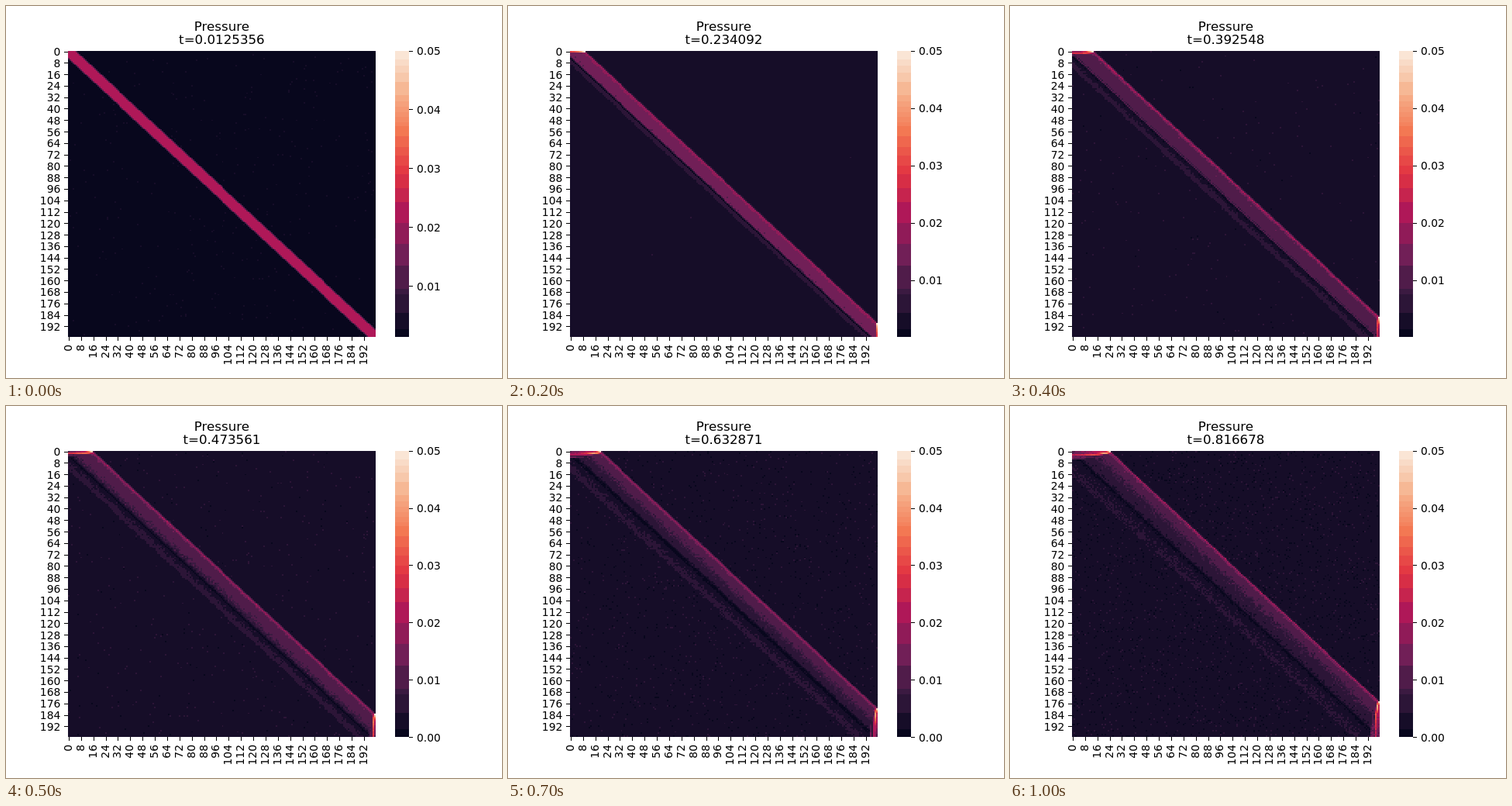
An HTML page with a canvas for the animation above (1.1 s loop, 640x480 px).

```html
<!DOCTYPE html>
<html lang="en">
<head>
<meta charset="utf-8">
<title>Pressure heatmap</title>
<style>
  html, body { margin: 0; width: 100%; height: 100%; overflow: hidden; background: #fff; }
  #stage { position: relative; width: 640px; height: 480px; overflow: hidden; }
  canvas, svg { position: absolute; left: 0; top: 0; }
  text { font: 13.89px "DejaVu Sans", sans-serif; fill: #000; }
  .title { font-size: 16.67px; text-anchor: middle; }
</style>
</head>
<body>
<div id="stage">
  <canvas id="plot" width="640" height="480"></canvas>
  <svg id="labels" width="640" height="480">
    <text class="title" x="278.4" y="32">Pressure</text>
    <text class="title" id="clock" x="278.4" y="49"></text>
    <g id="axes"></g>
    <g id="scale"></g>
  </svg>
</div>
<script>
const N = 200, STEP = 100, VMAX = 50;            // pressures are in thousandths
const BOX = { x: 80, y: 58, w: 397, h: 369 };
const BAR = { x: 502, w: 18 };
const TIMES = ['0.0125356', '0.124018', '0.234092', '0.313254', '0.392548', '0.473561',
  '0.556521', '0.632871', '0.709094', '0.762915', '0.816678'];
const VMIN = [1.3, 0.5, 0.1, 0.07, 0.04];        // zero afterwards

// Pressure across the diagonal: offsets (column - row) and values at key times.
const PROFILES = [
  { t: 0.0125, d: [6, 4, 3, 2, 0, -2, -3, -4, -6], v: [2.4, 22, 22, 22, 22, 22, 22, 22, 2.4] },
  { t: 0.234, d: [10.3, 8.8, 6.5, 3, -3.2, -5, -6, -8, -10], v: [3, 21, 15, 14, 13, 0.5, 6, 6, 3] },
  { t: 0.3925, d: [14.5, 13, 10.7, 5, -2, -3.5, -6, -10.5, -13], v: [2.9, 20, 11.5, 11, 9, 1, 3.6, 6, 2.9] },
  { t: 0.5565, d: [18.6, 17.3, 15, 9, 1, -2, -4, -12.5, -15.5], v: [2.8, 19, 11.5, 9, 5, 0.6, 2.8, 5.5, 2.8] },
  { t: 0.8167, d: [25.2, 24, 21.5, 12, 1, -1.5, -3, -15, -19], v: [2.7, 19, 11.5, 7.5, 4.4, 0.6, 2.7, 4.6, 2.7] }
];

const RAMP = ['03051a', '35193e', '701f57', 'ad1759', 'e13342', 'f37651', 'f6b48f', 'faebdd']
  .map(h => [0, 2, 4].map(i => parseInt(h.slice(i, i + 2), 16)));
// Colour steps, in pixels above the foot of the bar.
const EDGES = [0, 10, 31, 55, 62, 92, 120, 147, 174, 192, 210, 221, 234, 245, 259,
  272, 277, 284, 290, 297, 304, 312, 329, 341, 350, 358, 369];

const lerp = (a, b, k) => a + (b - a) * k;
const clamp = (x, lo, hi) => Math.min(hi, Math.max(lo, x));
const bump = x => Math.exp(-x * x);

function ramp(f) {
  const p = clamp(f, 0, 1) * 7, i = Math.min(6, Math.floor(p));
  return RAMP[i].map((c, j) => Math.round(lerp(c, RAMP[i + 1][j], p - i)));
}
const COLORS = EDGES.slice(1).map((e, i) => ramp((e + EDGES[i]) / 2 / BOX.h));
const LOOKUP = Array.from({ length: BOX.h + 1 }, (_, px) => {
  const i = EDGES.findIndex(e => e > px);
  return COLORS[i < 0 ? COLORS.length - 1 : i - 1];
});

function random(seed) {
  return () => {
    seed = (seed + 0x6d2b79f5) | 0;
    let z = Math.imul(seed ^ (seed >>> 15), 1 | seed);
    z = (z + Math.imul(z ^ (z >>> 7), 61 | z)) ^ z;
    return ((z ^ (z >>> 14)) >>> 0) / 4294967296;
  };
}

function profileAt(t) {
  let i = 0;
  while (i < PROFILES.length - 2 && t > PROFILES[i + 1].t) i++;
  const a = PROFILES[i], b = PROFILES[i + 1];
  const k = clamp((t - a.t) / (b.t - a.t), 0, 1);
  const mix = key => a[key].map((x, j) => lerp(x, b[key][j], k));
  return { d: mix('d'), v: mix('v') };
}

function across({ d, v }, x, t) {
  const last = d.length - 1;
  if (x >= d[0]) return v[0];
  if (x <= d[last]) return v[last];
  let i = 0;
  while (x < d[i + 1]) i++;
  const ripple = t > 0.3 && Math.abs(x + 2) < 3 && x & 1 ? 1.2 : 0;
  return lerp(v[i], v[i + 1], (d[i] - x) / (d[i] - d[i + 1])) - ripple;
}

// The wave piling up along a wall, curving up to its front.
function corner(depth, along, t) {
  const front = 3.4 + 25.8 * t;
  if (t < 0.1 || along > front || depth > 8) return 0;
  const s = along / front;
  const ridge = Math.max(0, 3.6 * (t - 0.2)) * (1 - s ** 3);
  const main = (24 + 23 * s * s + 8 * (1 - t)) * bump((depth - ridge) / 0.95);
  const echo = 26 * t * (1 - s) * bump((depth - ridge - 2.2) / 0.8);
  return Math.max(main, echo, depth < ridge ? 12 + 16 * s : 0);
}

function heatmap(step) {
  const t = +TIMES[step], vmin = VMIN[step] || 0;
  const profile = profileAt(t), rnd = random(step * 977 + 5);
  const noise = 0.85 * Math.sqrt(t) * 1.73;
  const line = Array.from({ length: 2 * N }, (_, i) => across(profile, i - N, t));
  const tile = document.createElement('canvas');
  tile.width = tile.height = N;
  const ctx = tile.getContext('2d'), img = ctx.createImageData(N, N);
  for (let r = 0; r < N; r++) {
    for (let c = 0; c < N; c++) {
      const wall = Math.max(corner(r, c, t), corner(N - 1 - c, N - 1 - r, t));
      const jitter = noise * (rnd() + rnd() + rnd() + rnd() - 2);
      const v = Math.max(line[c - r + N], wall) + jitter;
      const px = clamp(Math.floor((v - vmin) / (VMAX - vmin) * BOX.h), 0, BOX.h);
      img.data.set([...LOOKUP[px], 255], (r * N + c) * 4);
    }
  }
  ctx.putImageData(img, 0, 0);
  return tile;
}

const ctx = document.getElementById('plot').getContext('2d');
const axes = document.getElementById('axes');
const scale = document.getElementById('scale');
const clock = document.getElementById('clock');

function add(parent, name, attrs, text) {
  const el = document.createElementNS('http://www.w3.org/2000/svg', name);
  for (const key in attrs) el.setAttribute(key, attrs[key]);
  if (text !== undefined) el.textContent = text;
  parent.append(el);
}
const tick = (parent, x, y, width, height) =>
  add(parent, 'rect', { x: Math.round(x), y: Math.round(y), width, height });

for (let n = 0; n < N; n += 8) {
  const x = 80 + (n + 0.5) * 1.984, y = 57.6 + (n + 0.5) * 1.848;
  tick(axes, 75, y, 5, 1);
  add(axes, 'text', { x: 70.3, y: Math.round(y + 5.5), 'text-anchor': 'end' }, n);
  tick(axes, x, 427, 1, 5);
  add(axes, 'text', {
    transform: `translate(${Math.round(x + 4)} 437) rotate(-90)`, 'text-anchor': 'end'
  }, n);
}

function drawScale(vmin) {
  scale.replaceChildren();
  for (let v = 0; v <= VMAX; v += 10) {
    if (v < vmin) continue;
    const y = 57.6 + 369.6 * (VMAX - v) / (VMAX - vmin);
    tick(scale, 520, y, 5, 1);
    add(scale, 'text', { x: 530, y: Math.round(y + 5.5) }, (v / 1000).toFixed(2));
  }
}

ctx.imageSmoothingEnabled = false;
COLORS.forEach((c, i) => {
  ctx.fillStyle = `rgb(${c})`;
  ctx.fillRect(BAR.x, BOX.y + BOX.h - EDGES[i + 1], BAR.w, EDGES[i + 1] - EDGES[i]);
});

const tiles = TIMES.map((_, step) => heatmap(step));
let shown = -1;

function show(step) {
  if (step === shown) return;
  shown = step;
  ctx.drawImage(tiles[step], BOX.x, BOX.y, BOX.w, BOX.h);
  clock.textContent = 't=' + TIMES[step];
  drawScale(VMIN[step] || 0);
}

let start = null;
function play(now) {
  if (start === null) start = now;
  show(Math.floor((now - start) / STEP) % TIMES.length);
  requestAnimationFrame(play);
}
show(0);
requestAnimationFrame(play);
</script>
</body>
</html>
```
